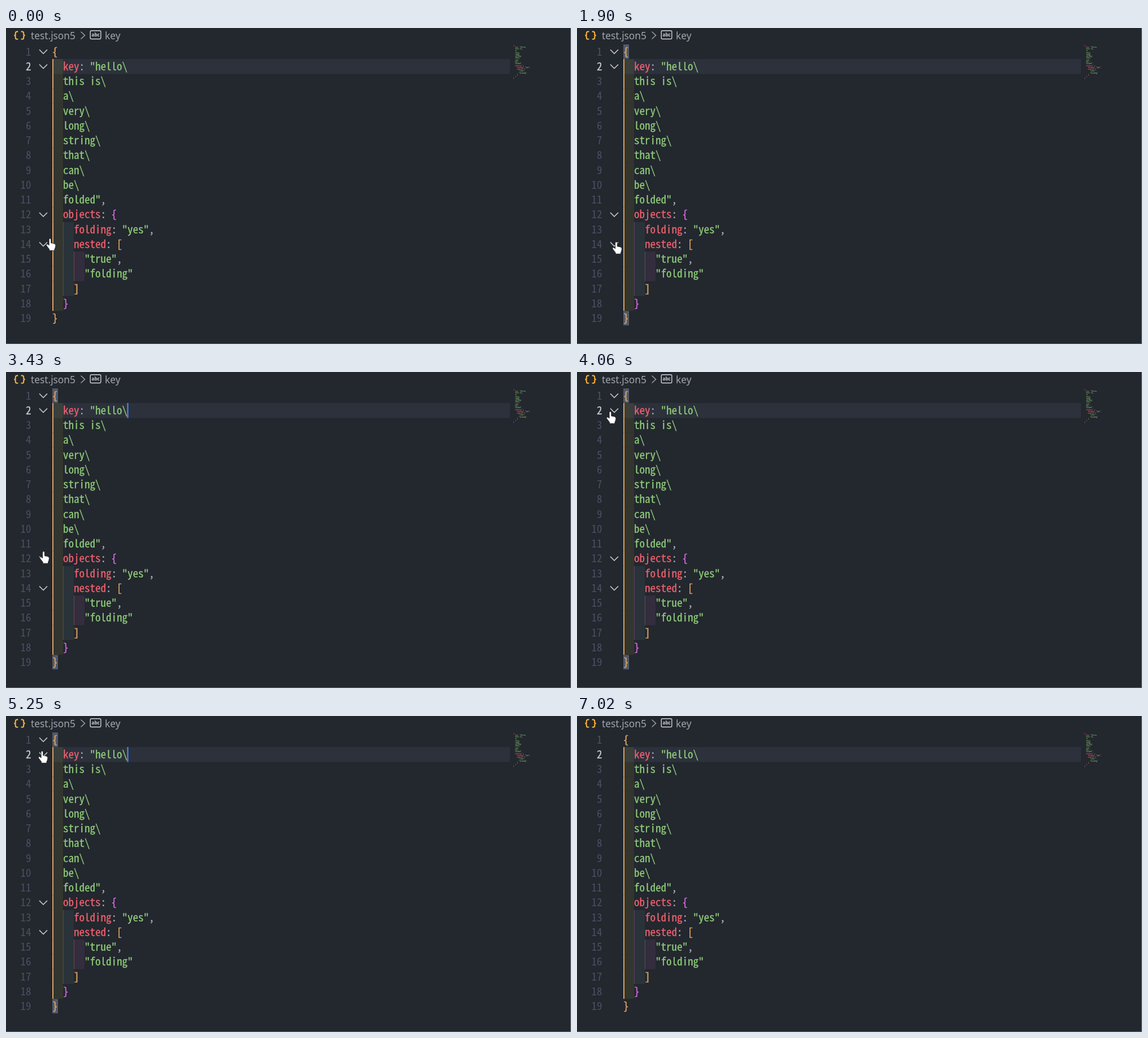
Write an HTML page with a canvas that moves like this. It is 1000 by 560 pixels and loops after 7.04 s.

```html
<!DOCTYPE html>
<html lang="en">
<head>
<meta charset="utf-8">
<title>Folding JSON5</title>
<style>
html, body { margin: 0; width: 100%; height: 100%; overflow: hidden; background: #23272e; }
canvas { display: block; }
</style>
</head>
<body>
<canvas id="stage" width="1000" height="560"></canvas>
<script>
const ctx = document.getElementById('stage').getContext('2d');
const LOOP = 7040, FOCUS = 1260, BLUR = 7020, BLINK = 495, LEAVE = 5700;
const ROW = 26.25, TOP = 28.7, LEFT = 82, CELL = 9.5, INDENT = 2 * CELL;
const MONO = '19px "Noto Sans Mono CJK JP", "Noto Sans Mono CJK SC", "Noto Sans Mono", monospace';
const GREY = '#abb2bf', RED = '#ee616e', GREEN = '#8fcc79', ORANGE = '#d9a062', PURPLE = '#d066dd';

const lines = String.raw`{
  key: "hello\
  this is\
  a\
  very\
  long\
  string\
  that\
  can\
  be\
  folded",
  objects: {
    folding: "yes",
    nested: [
      "true",
      "folding"
    ]
  }
}`.split('\n').map((raw, i) => ({ no: i + 1, text: raw.trim(), indent: raw.search(/\S/) / 2 }));

// Foldable ranges, and when each one is closed
const folds = [
  { head: 1, last: 18 },
  { head: 14, last: 16, from: 1380, to: 1900 },
  { head: 12, last: 17, from: 2760, to: 3190 },
  { head: 2, last: 11, from: 4580, to: 5250 },
];

const home = { x: 71, y: 373 };
const moves = [
  { from: 250, to: 450, x: 62.5, y: 379 },
  { from: 2050, to: 2360, x: 60, y: 332 },
  { from: 3310, to: 4060, x: 52, y: 70 },
  { from: 4060, to: 4300, x: 57, y: 62 },
  { from: LEAVE, to: 6130, x: 766, y: 525 },
];

const tints = ['rgba(255,255,64,.07)', 'rgba(120,185,185,.08)', 'rgba(255,127,255,.07)'];
const guides = [ORANGE, 'rgba(213,95,222,.3)', 'rgba(209,120,110,.35)'];
const hand = new Path2D('M5 2Q5 0 6.7 0T8.4 2V7.6L14 8.8Q16.4 9.4 16.2 12L15.4 16.2 14.4 18V20.5H5.5V18.4L.8 12.2Q-.4 10.3 1 9.7T5 11.6Z');
const brace = new Path2D('M7.5 0H6Q3 0 3 2.5V4.5Q3 6.7 .5 6.7 3 6.7 3 9V11Q3 13.4 6 13.4H7.5');

const progress = (t, from, to) => Math.min(1, Math.max(0, (t - from) / (to - from)));

function box(x, y, w, h, color) {
  ctx.fillStyle = color;
  ctx.fillRect(x, y, w, h);
}

function polyline(color, width, ...points) {
  ctx.strokeStyle = color;
  ctx.lineWidth = width;
  ctx.beginPath();
  for (const [x, y] of points) ctx.lineTo(x, y);
  ctx.stroke();
}

function write(text, x, y, color, weight = 0) {
  ctx.fillStyle = ctx.strokeStyle = color;
  ctx.fillText(text, x, y);
  if (!weight) return;
  ctx.lineWidth = weight;
  ctx.strokeText(text, x, y);
}

function useMono() {
  ctx.font = MONO;
  ctx.letterSpacing = '0px';
  ctx.letterSpacing = CELL - ctx.measureText('0').width + 'px';
}

// Writes one coloured line of code and returns its right end
function code(line, x, y) {
  for (const [word] of line.text.matchAll(/\w+(?=:)|[{}[\]]|[:,]|[^{}[\]:,]+/g)) {
    const bracket = /[{}[\]]/.test(word);
    const color = bracket ? (line.indent === 1 ? PURPLE : ORANGE)
      : /[:,]/.test(word) ? GREY
      : /^\w+$/.test(word) ? RED : GREEN;
    write(word, x, y, color, bracket ? .6 : .3);
    x += word.length * CELL;
  }
  return x;
}

function chevron(y, closed) {
  if (closed) polyline('#c5c5c5', 1.5, [63.5, y - 7], [70.5, y], [63.5, y + 7]);
  else polyline('#c5c5c5', 1.5, [59, y - 3.5], [66, y + 3.5], [73, y - 3.5]);
}

function header() {
  ctx.strokeStyle = '#f9b233';
  ctx.lineWidth = 2.1;
  for (const side of [1, -1]) {
    ctx.save();
    ctx.translate(24 - side * 10.2, 6.4);
    ctx.scale(side, 1);
    ctx.stroke(brace);
    ctx.restore();
  }
  ctx.letterSpacing = '0px';
  ctx.font = '17.3px "Noto Sans", "Open Sans", sans-serif';
  write('test.json5', 44, 20, '#a0a5ae');
  write('key', 175, 20, '#a0a5ae');
  polyline('#a0a5ae', 1.4, [132.5, 6.5], [139.5, 13], [132.5, 19.5]);
  ctx.strokeStyle = '#d0d3d8';
  ctx.lineWidth = 1.4;
  ctx.beginPath();
  ctx.roundRect(149.2, 4.7, 18.6, 14.8, 2);
  ctx.stroke();
  ctx.font = 'bold 8px "Noto Sans", sans-serif';
  write('abc', 151.6, 14.6, '#d0d3d8');
}

function editorRow(line, i, closed, t) {
  const y = TOP + i * ROW, active = line.no === 2, focused = t >= FOCUS && t < BLUR;
  if (active) box(83, y, 809, ROW + .5, '#2c313c');
  if (closed) box(83, y, 809, ROW + .5, active ? '#383d49' : '#2c3138');
  for (let d = 0; d < line.indent; d++) {
    box(LEFT + d * INDENT, y, INDENT, ROW, tints[d]);
    box(LEFT + d * INDENT, y, d ? 1 : 2, ROW, guides[d]);
  }
  if (!line.indent && focused && t > FOCUS + 100) box(LEFT, y + .4, 10, ROW - .8, '#515a6b');

  const no = String(line.no);
  write(no, 44.5 - no.length * CELL, y + 20, active ? '#c6ccd7' : '#495162', active ? .3 : 0);
  const end = code(line, LEFT + line.indent * INDENT, y + 20);
  if (closed) for (let d = 0; d < 3; d++) box(end + 4.5 + d * 6, y + 12.8, 2, 1.8, '#757c89');

  const blinkOn = Math.floor((t - FOCUS) / BLINK) % 2 === 0;
  if (active && focused && blinkOn) box(214.5, y, 2, ROW + .5, '#528bff');

  if (folds.some(f => f.head === line.no)) {
    ctx.globalAlpha = 1 - progress(t, LEAVE, 6130);
    chevron(y + 13.2, closed);
    ctx.globalAlpha = 1;
  }
}

function minimapRow(line, i, closed) {
  const y = 29 + i * 3.27, cell = 1.6;
  if (closed) box(898, y - .2, 100, 3.2, '#2f343c');
  ctx.save();
  ctx.translate(898 + line.indent * 2 * cell, y + 2.6);
  ctx.scale(cell / CELL, cell / CELL);
  code(line, 0, 0);
  ctx.restore();
}

function pointerAt(t) {
  let { x, y } = home;
  for (const m of moves) {
    const p = progress(t, m.from, m.to) ** 1.6;
    x += (m.x - x) * p;
    y += (m.y - y) * p;
  }
  return [x, y];
}

function pointer(t) {
  if (t >= 6280) return;
  const [x, y] = pointerAt(t);
  ctx.save();
  ctx.translate(x, y);
  if (t >= LEAVE) {
    box(0, -7, 1.2, 15, '#d8dade');
    for (const end of [-7, 7]) box(-2, end, 5, 1, '#d8dade');
  } else {
    ctx.scale(1.04, 1.04);
    ctx.fillStyle = '#fff';
    ctx.strokeStyle = '#16191e';
    ctx.lineWidth = .7;
    ctx.fill(hand);
    ctx.stroke(hand);
  }
  ctx.restore();
}

function draw(t) {
  const fold = folds.find(f => t >= f.from && t < f.to);
  box(0, 0, 1000, 560, '#23272e');
  header();
  useMono();
  lines
    .filter(l => !fold || l.no <= fold.head || l.no > fold.last)
    .forEach((line, i) => {
      const closed = line.no === fold?.head;
      editorRow(line, i, closed, t);
      minimapRow(line, i, closed);
    });
  box(999, 0, 1, 560, '#777b80');
  box(0, 559, 1000, 1, '#5d6167');
  pointer(t);
}

const start = performance.now();
function tick() {
  draw((performance.now() - start) % LOOP);
  requestAnimationFrame(tick);
}
tick();
</script>
</body>
</html>
```
